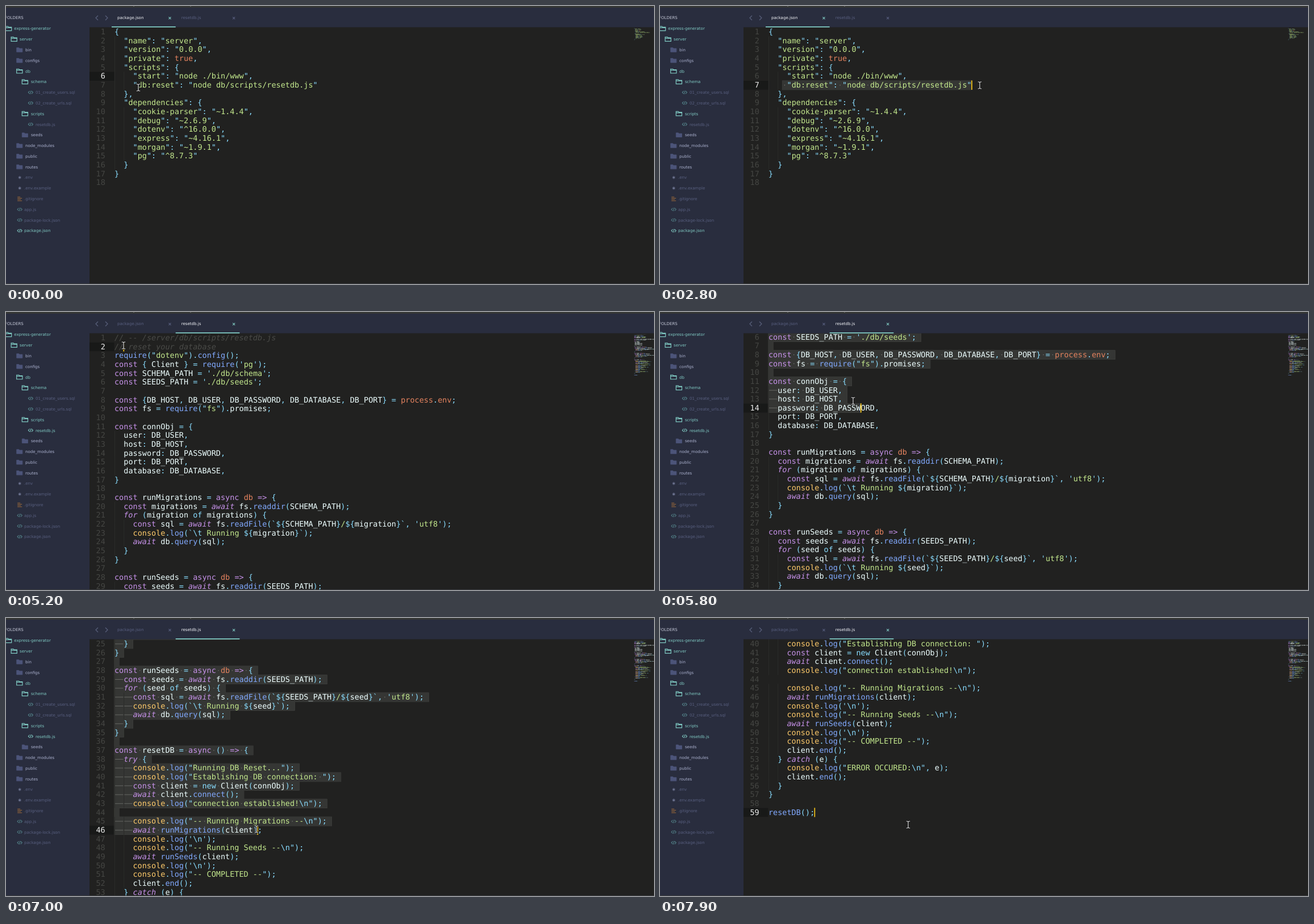
Recreate the animation shown at these times as an HTML page. Size 1141x491 px, loop 8 s.

```html
<!DOCTYPE html>
<html lang="en">
<head>
<meta charset="utf-8">
<title>Editor walkthrough</title>
<style>
html, body { margin: 0; width: 100%; height: 100%; overflow: hidden; background: #212120; }
svg { display: block; width: 100vw; height: 100vh; }
text { white-space: pre; text-rendering: geometricPrecision; }
.ui text { font: 7.06px "DejaVu Sans", sans-serif; }
.code text { font: 13.515px "DejaVu Sans Mono", monospace; fill: #eeffff; }
.code .num { fill: #454643; text-anchor: end; }
.code .num.on { fill: #eeeeee; }
.punct { fill: #89ddff; }
.str { fill: #c3e88d; }
.key { fill: #c792ea; }
.flow { fill: #c792ea; font-style: italic; }
.fn { fill: #82aaff; }
.obj { fill: #ffcb6b; }
.const { fill: #e5835f; }
.note { fill: #4a4b48; font-style: italic; }
.plain { fill: #eeffff; }
</style>
</head>
<body>
<script type="text/plain" id="pkg">
{
  "name": "server",
  "version": "0.0.0",
  "private": true,
  "scripts": {
    "start": "node ./bin/www",
    "db:reset": "node db/scripts/resetdb.js"
  },
  "dependencies": {
    "cookie-parser": "~1.4.4",
    "debug": "~2.6.9",
    "dotenv": "^16.0.0",
    "express": "~4.16.1",
    "morgan": "~1.9.1",
    "pg": "^8.7.3"
  }
}

</script>
<script type="text/plain" id="reset">
// -- /server/db/scripts/resetdb.js
// reset your database
require("dotenv").config();
const { Client } = require('pg');
const SCHEMA_PATH = './db/schema';
const SEEDS_PATH = './db/seeds';

const {DB_HOST, DB_USER, DB_PASSWORD, DB_DATABASE, DB_PORT} = process.env;
const fs = require("fs").promises;

const connObj = {
  user: DB_USER,
  host: DB_HOST,
  password: DB_PASSWORD,
  port: DB_PORT,
  database: DB_DATABASE,
}

const runMigrations = async db => {
  const migrations = await fs.readdir(SCHEMA_PATH);
  for (migration of migrations) {
    const sql = await fs.readFile(`${SCHEMA_PATH}/${migration}`, 'utf8');
    console.log(`\t Running ${migration}`);
    await db.query(sql);
  }
}

const runSeeds = async db => {
  const seeds = await fs.readdir(SEEDS_PATH);
  for (seed of seeds) {
    const sql = await fs.readFile(`${SEEDS_PATH}/${seed}`, 'utf8');
    console.log(`\t Running ${seed}`);
    await db.query(sql);
  }
}

const resetDB = async () => {
  try {
    console.log("Running DB Reset...");
    console.log("Establishing DB connection: ");
    const client = new Client(connObj);
    await client.connect();
    console.log("connection established!\n");

    console.log("-- Running Migrations --\n");
    await runMigrations(client);
    console.log('\n');
    console.log("-- Running Seeds --\n");
    await runSeeds(client);
    console.log('\n');
    console.log("-- COMPLETED --");
    client.end();
  } catch (e) {
    console.log("ERROR OCCURED:\n", e);
    client.end();
  }
}

resetDB();
</script>
<svg id="stage" viewBox="0 0 1141 491" preserveAspectRatio="none">
  <defs><clipPath id="pane"><rect x="147" y="37.5" width="994" height="452.5"/></clipPath></defs>
  <rect width="1141" height="491" fill="#212120"/>
  <g clip-path="url(#pane)">
    <g id="scroller" class="code">
      <rect id="activeRow" x="147" width="43.5" height="15.7" fill="#181918"/>
      <path id="selection" fill="#353634" stroke="#424340" stroke-linejoin="round" paint-order="stroke"/>
      <path id="dots" fill="none" stroke="#7a7b77" stroke-width="1.5" stroke-linecap="round"/>
      <path id="tabMarks" fill="none" stroke="#666763"/>
      <g id="files"></g>
      <rect id="caret" width="1.7" height="16.4" fill="#f5c518"/>
    </g>
    <g id="maps" class="code"></g>
  </g>
  <g class="ui">
    <rect width="147" height="491" fill="#292d3e"/>
    <rect width="1141" height="37.5" fill="#292d3e"/>
    <rect width="1141" height="3" fill="#343635"/>
    <path d="M224 0h2M324 0h2" stroke="#999"/>
    <rect y="490" width="1141" height="1" fill="#3b3d40"/>
    <path d="M162 17l-4 4l4 4M175 17l4 4l-4 4" fill="none" stroke="#59607c" stroke-width="1.2"/>
    <text x="-2" y="23.2" fill="#c5c9d8">FOLDERS</text>
    <g id="sidebar"></g>
    <g id="tabs"></g>
  </g>
  <g id="pointer" stroke-linecap="round" stroke-linejoin="round">
    <g id="beam" fill="none">
      <path d="M-3 -6h1.5l1.5 1l1.5 -1h1.5M0 -5V5M-3 6h1.5l1.5 -1l1.5 1h1.5" stroke="#111" stroke-width="3"/>
      <path d="M-3 -6h1.5l1.5 1l1.5 -1h1.5M0 -5V5M-3 6h1.5l1.5 -1l1.5 1h1.5" stroke="#ddd" stroke-width="1.2"/>
    </g>
    <path id="arrow" d="M0 0V11l2.7 -2.5l1.8 4l1.7 -.8l-1.8 -3.8h3.6z" fill="#111" stroke="#ddd" stroke-width=".8"/>
  </g>
</svg>
<script>
const LOOP = 8000, STEP = 100, LAG = 50;
const LEFT = 191, TOP = 38, CHAR = 8.1365, ROW = 15.66, BASELINE = 12.1;
const TEAL = '#80cbc4', DIM = '#596080', LIGHT = '#abb2cf';
// An imperceptible turn keeps baselines from snapping to whole pixels.
const UNSNAP = 'rotate(.003)';
const $ = id => document.getElementById(id);
const attr = (id, values) => {
  for (const name in values) $(id).setAttribute(name, values[name]);
};
const show = (id, on) => { $(id).style.display = on ? '' : 'none'; };
const clamp = (v, lo, hi) => Math.max(lo, Math.min(hi, v));
const colX = col => LEFT + col * CHAR;
const rowY = row => TOP + row * ROW;
const indentOf = line => line.search(/\S|$/);

const files = Object.fromEntries(['pkg', 'reset'].map(id =>
  [id, $(id).textContent.replace(/^\n|\n$/g, '').split('\n')]));

// Syntax colouring
const rules = [
  ['note', /\/\/.*/y],
  ['quoted', /"[^"]*"|'[^']*'|`[^`]*`/y],
  ['const', /true\b|process(?=\.env)|env\b|db(?= =>)/y],
  ['flow', /(await|for|try|catch)\b/y],
  ['key', /(const|async)\b|=>/y],
  ['punct', /(new|of)\b/y],
  ['obj', /console\b/y],
  ['fn', /[a-z]\w*(?=\()/y],
  ['plain', /\w+|\s+/y],
  ['punct', /[^\w\s"'`]/y],
];
const span = (kind, s) =>
  `<tspan class="${kind}">${s.replace(/&/g, '&amp;').replace(/</g, '&lt;')}</tspan>`;

function quoted(s) {
  const parts = s.split(/(\$\{|[}`"']|\\.)/);
  return parts.map((p, i) => p &&
    span(i % 2 ? 'punct' : parts[i - 1] === '${' ? 'plain' : 'str', p)).join('');
}

function highlight(line) {
  let out = '', at = 0;
  while (at < line.length) {
    for (const [kind, re] of rules) {
      re.lastIndex = at;
      const hit = re.exec(line);
      if (!hit) continue;
      out += kind === 'quoted' ? quoted(hit[0]) : span(kind, hit[0]);
      at += hit[0].length;
      break;
    }
  }
  return out;
}

function buildFile(id) {
  let text = '', nums = '', guides = '';
  files[id].forEach((line, i) => {
    const indent = indentOf(line), y = rowY(i) + BASELINE;
    text += `<text x="${colX(indent)}" y="${y}">${highlight(line.slice(indent))}</text>`;
    nums += `<text class="num" x="174.8" y="${y}">${i + 1}</text>`;
    for (let c = 0; c < indent; c += 2) guides += `M${colX(c) + .5} ${rowY(i)}v${ROW}`;
  });
  $('files').innerHTML += `<g id="${id}File"><path d="${guides}" stroke="#2b2c2a"/>
    <g id="${id}Nums">${nums}</g><g id="${id}Text">${text}</g></g>`;
  // Overlaid copies give the tiny text the weight of solid strokes.
  const copies = [0, .2, .4].map(dy => `<use href="#${id}Text"
    transform="translate(1106 ${38.8 + dy}) scale(.0775 .079) translate(${-LEFT} ${-TOP})"/>`);
  $('maps').innerHTML += `<g id="${id}Map">${copies.join('')}</g>`;
}

// Sidebar and tabs
const tree = [
  ['open', 0, 'express-generator'], ['open', 1, 'server'], ['folder', 2, 'bin'],
  ['folder', 2, 'configs'], ['open', 2, 'db'], ['open', 3, 'schema'],
  ['code', 4, '01_create_users.sql'], ['code', 4, '02_create_urls.sql'],
  ['open', 3, 'scripts'], ['code', 4, 'resetdb.js'], ['folder', 3, 'seeds'],
  ['folder', 2, 'node_modules'], ['folder', 2, 'public'], ['folder', 2, 'routes'],
  ['star', 2, '.env'], ['star', 2, '.env.example'], ['list', 2, '.gitignore'],
  ['code', 2, 'app.js'], ['code', 2, 'package-lock.json'], ['code', 2, 'package.json'],
];
const folder = 'M0 -3.7h4l1.2 1.3h5v6.2h-10.2z';
const icons = {
  open: `<path d="${folder}M0 -1.5h10" fill="none" stroke="${TEAL}" stroke-width="1.2"/>`,
  folder: `<path d="${folder}" fill="#4c5479" stroke="#4c5479" stroke-width=".8"/>`,
  code: '<path d="M3.8 -2.5l-2.4 2.5l2.4 2.5M7.2 -2.5l2.4 2.5l-2.4 2.5M6.1 -3l-1.2 6" fill="none" stroke="currentColor"/>',
  star: '<path d="M5.5 -2.6v5.2M3.2 -1.3l4.6 2.6M7.8 -1.3l-4.6 2.6" stroke="#737a98"/>',
  list: '<path d="M1.5 -3.3h5M1.5 -1h8M1.5 1.2h6M1.5 3.5h8" stroke="#99683a"/>',
};

function drawChrome(current) {
  $('sidebar').innerHTML = tree.map(([kind, level, label], i) => {
    const y = 39.8 + i * 18.79, isDir = kind === 'open' || kind === 'folder';
    const active = label === current;
    const fill = kind === 'open' || active ? TEAL : isDir ? LIGHT : DIM;
    const x = level * 9.6 - .5;
    const textX = isDir ? 14.2 + level * 9.9 : 32 + (level - 2) * 10;
    return `<g transform="translate(${x} ${y})" color="${active ? TEAL : '#56898f'}">${icons[kind]}</g>
      <text x="${textX}" y="${y + 2.6}" fill="${fill}">${label}</text>`;
  }).join('');
  $('tabs').innerHTML = ['package.json', 'resetdb.js'].map((label, i) => {
    const x = 186 + i * 112.7, active = label === current;
    return `<text x="${x + 10}" y="23.3" fill="${active ? '#f4f6fa' : DIM}">${label}</text>
      <path d="M${x + 100.5} 19.3l4 4m0 -4l-4 4" stroke="${active ? TEAL : DIM}" stroke-width="1.1"/>
      ${active ? `<rect x="${x}" y="36" width="112.7" height="1.8" fill="${TEAL}"/>` : ''}`;
  }).join('');
}

// Motion: [time, values...]
const pointerKeys = [
  [100, 233, 144], [400, 217, 142], [600, 217, 142], [1500, 566, 138], [1800, 566, 138],
  [1900, 568, 138], [2400, 568, 138], [2500, 570, 142], [2600, 568, 144], [2700, 568, 144],
  [2800, 563, 140], [3100, 540, 158], [3300, 540, 158], [3700, 326, 28], [4100, 330, 27],
  [4300, 330, 27], [4500, 310, 128], [4600, 310, 128], [4900, 220, 58], [5100, 220, 58],
  [5200, 207, 59], [5300, 207, 59], [5800, 340, 157], [5900, 367, 177], [6300, 441, 366],
  [6900, 441, 366], [7000, 441, 373], [7400, 441, 373], [7900, 437, 365],
];
const scrollKeys = [
  [5500, 0], [5800, 5.1], [6000, 9], [6300, 12], [6400, 12], [6500, 15], [6600, 15],
  [6800, 21], [6900, 21], [7000, 24], [7200, 39],
];

function along(keys, t) {
  const i = keys.findIndex(k => k[0] > t);
  if (i === 0) return keys[0].slice(1);
  if (i < 0) return keys.at(-1).slice(1);
  const [a, b] = [keys[i - 1], keys[i]], f = (t - a[0]) / (b[0] - a[0]);
  return a.slice(1).map((v, j) => v + (b[j + 1] - v) * f);
}

function editState(t, lines, scroll) {
  const [x, y] = along(pointerKeys, t + LAG);
  if (t < 700) return { row: 5 };
  if (t < 2900) return { row: 6, col: clamp(Math.round((x - LEFT) / CHAR), 3, 44), anchor: [6, 3] };
  if (t < 3800) return { row: 7, col: 4 };
  if (t < 5200) return { row: -1 };
  const row = clamp(Math.floor((y - TOP) / ROW + scroll), 0, lines.length - 1);
  const col = clamp(Math.round((x - LEFT) / CHAR), 0, lines[row].length);
  return t < 7500 ? { row, col, anchor: [1, 2] } : { row: 58, col: 10 };
}

function drawSelection(lines, { row, col, anchor }, tabbed) {
  let area = '', dots = '', tabs = '';
  for (let r = anchor ? anchor[0] : Infinity; r <= row; r++) {
    const line = lines[r], indent = indentOf(line);
    const from = r === anchor[0] ? anchor[1] : 0;
    const to = r === row ? col : line.length + 1;
    if (to > from) area += `M${colX(from)} ${rowY(r)}H${colX(to)}v${ROW + .05}H${colX(from)}z`;
    for (let c = from; c < Math.min(to, line.length); c++) {
      if (line[c] !== ' ') continue;
      const y = rowY(r) + 7.8;
      if (!tabbed || c >= indent) dots += `M${colX(c + .5)} ${y}h.01`;
      else if (c % 2 === 0) tabs += `M${colX(c) + .8} ${y}h14.6`;
    }
  }
  attr('selection', { d: area });
  attr('dots', { d: dots });
  attr('tabMarks', { d: tabs });
}

let currentFile;
function draw(t) {
  const id = t < 3800 ? 'pkg' : 'reset', lines = files[id];
  if (id !== currentFile) {
    currentFile = id;
    drawChrome(id === 'pkg' ? 'package.json' : 'resetdb.js');
    for (const f in files) {
      show(f + 'File', f === id);
      show(f + 'Map', f === id);
    }
  }
  const [scroll] = along(scrollKeys, t), edit = editState(t, lines, scroll);
  attr('scroller', { transform: `translate(0 ${-scroll * ROW}) ${UNSNAP}` });
  drawSelection(lines, edit, id === 'reset');
  [...$(id + 'Nums').children].forEach((n, i) => n.classList.toggle('on', i === edit.row));
  attr('activeRow', { y: rowY(edit.row) });
  show('activeRow', edit.row >= 0);
  show('caret', edit.col !== undefined);
  attr('caret', { x: colX(edit.col || 0) - .8, y: rowY(edit.row) - .4 });

  const [x, y] = along(pointerKeys, t);
  attr('pointer', { transform: `translate(${x} ${y})` });
  show('beam', y >= 37);
  show('arrow', y < 37);
}

Object.keys(files).forEach(buildFile);
for (const id of ['maps', 'sidebar', 'tabs']) attr(id, { transform: UNSNAP });
let last = -1;
function tick() {
  const t = Math.floor(performance.now() % LOOP / STEP) * STEP;
  if (t !== last) draw(last = t);
  requestAnimationFrame(tick);
}
tick();
</script>
</body>
</html>
```
